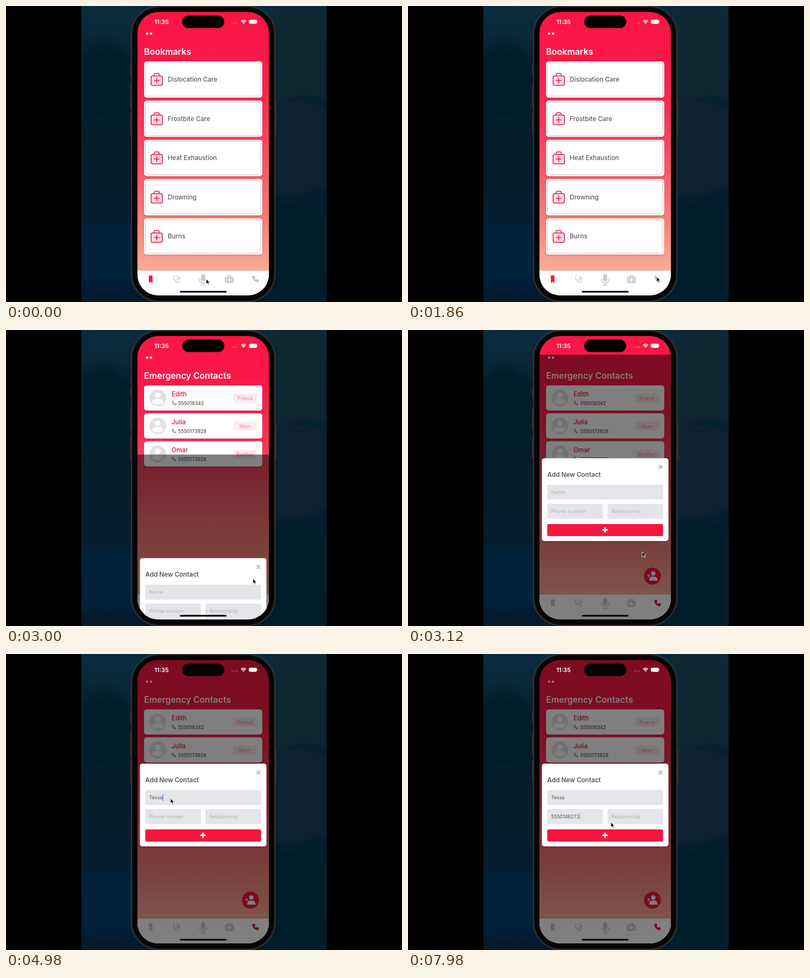
Write an HTML page that moves like this. It is 720 px wide and 540 px high and loops after 8000 ms.

```html
<!DOCTYPE html>
<html lang="en">
<head>
<meta charset="utf-8">
<title>Emergency contacts</title>
<style>
  html, body { margin: 0; width: 100%; height: 100%; overflow: hidden; background: #000; }
  svg { display: block; width: 720px; height: 540px; }
  text { font-family: Inter, "Open Sans", sans-serif; font-weight: 500; white-space: pre; }
  .title { font-size: 15.7px; font-weight: 600; fill: #fff; }
  .item { font-size: 11.5px; fill: #5c5c60; }
  .name { font-size: 11.5px; fill: #e5133f; }
  .num { font-size: 8.7px; fill: #4f4f53; }
  .tag { font-size: 9px; font-weight: 400; fill: #f4819c; text-anchor: middle; }
  .head { font-size: 11.5px; font-weight: 600; fill: #58585c; }
  .hint { font-size: 9.1px; font-weight: 400; fill: #b4b5ba; }
  .typed { font-size: 8.6px; fill: #66676b; }
  .clock { font-size: 10.8px; font-weight: 600; fill: #fff; }
</style>
</head>
<body>
<svg id="stage" viewBox="0 0 720 540" xmlns="http://www.w3.org/2000/svg"></svg>
<script>
const LOOP = 8000, RED = '#f7153f', GREY = '#c9c9cb';
const TOP = 11, HEIGHT = 517;

const rect = (x, y, w, h, r, fill, more = '') =>
  `<rect x="${x}" y="${y}" width="${w}" height="${h}" rx="${r}" fill="${fill}" ${more}/>`;
const circle = (x, y, r, fill, more = '') => `<circle cx="${x}" cy="${y}" r="${r}" fill="${fill}" ${more}/>`;
const path = (d, fill, more = '') => `<path d="${d}" fill="${fill}" ${more}/>`;
const line = (d, color, width) =>
  path(d, 'none', `stroke="${color}" stroke-width="${width}" stroke-linecap="round" stroke-linejoin="round"`);
const text = (x, y, cls, str, more = '') => `<text x="${x}" y="${y}" class="${cls}" ${more}>${str}</text>`;
const group = (id, body) => `<g id="${id}">${body}</g>`;
const gradient = (id, stops) =>
  `<linearGradient id="${id}" gradientUnits="userSpaceOnUse" x1="0" y1="0" x2="0" y2="540">` +
  stops.map(([y, c]) => `<stop offset="${y / 540}" stop-color="${c}"/>`).join('') + '</linearGradient>';

// ---- icons ----
const handset = (x, y, size, color) => path(
  'M3.5 1 6.2.5 8 4.6 6.2 6.2C7 8 8 9.2 9.9 10L11.5 8.1 15.6 9.9 15 12.8C14.7 14.7 14 15.3 12.6 15.2 6.3 14.4 1.7 9.7.8 3.4.7 2 1.5 1.3 3.5 1Z',
  color, `transform="translate(${x} ${y}) scale(${size / 16})"`);

const kit = y =>
  line(`M269.5 ${y - 6.5}v-2.4q0-2 2-2h5q2 0 2 2v2.4`, '#e3194a', 1.5) +
  rect(263.8, y - 6.5, 20.6, 17.3, 3, '#fcdbe2', 'stroke="#e3194a" stroke-width="1.5"') +
  line(`M269.4 ${y + 2.1}h9.2M274 ${y - 2.5}v9.2`, '#e3194a', 1.5);

const avatar = y =>
  circle(276, y, 15.3, '#e1e1e3') + circle(276, y - 4.8, 5.3, '#fff') +
  path(`M265.8 ${y + 9.6}q.4-7.6 6.8-7.6h6.8q6.4 0 6.8 7.6q-10 4-20.4 0z`, '#fff');

const tabIcons =
  line('M306 492.4h-1.2v4q0 3.6 3.6 3.6t3.6-3.6v-4h-1.2M308.4 500v1.2q0 3.4 3.3 3.4t3.3-3.4v-3', GREY, 1.3) +
  circle(315, 496.4, 1.4, 'none', `stroke="${GREY}" stroke-width="1.2"`) +
  rect(354.7, 489, 7.6, 13.4, 3.8, GREY) +
  line('M352 498.2v1.2q0 5.8 6.5 5.8t6.5-5.8v-1.2M358.5 505.4v3.4M354.8 509.2h7.4', GREY, 1.5) +
  line('M402.8 494v-1.4q0-1 1-1h4.4q1 0 1 1v1.4', GREY, 1.6) +
  rect(398, 493.8, 16, 11.6, 1.6, GREY) +
  path('M400.5 493.8h.9v11.6h-.9zM410.6 493.8h.9v11.6h-.9zM404.9 495.9h2.2v2.5h2.5v2.2h-2.5v2.5h-2.2v-2.5h-2.5v-2.2h2.5z', '#fff');

const tabBar = (mark, call) =>
  rect(239, 481, 239, 2, 0, '#8a4040', 'opacity=".13"') + rect(239, 482.5, 239, 46, 0, '#fff') +
  path('M259.7 491.4h6.6v14l-3.3-2.6-3.3 2.6z', mark) + tabIcons + handset(447, 491.4, 13.2, call);

const addButton =
  circle(444.5, 449, 15.4, RED) + circle(446, 444.3, 4, '#fff') +
  path('M438.4 457.2q.2-7 5-7.4h5.2q4.8.4 5 7.4z', '#fff') +
  line('M435.3 448.2h4.8M437.7 445.8v4.8', '#fff', 1.2);

// ---- screens ----
const title = str => text(251, 89, 'title', str);
const topics = ['Dislocation Care', 'Frostbite Care', 'Heat Exhaustion', 'Drowning', 'Burns'];
const bookmarks = title('Bookmarks') + topics.map((topic, i) => {
  const y = 101 + i * 71.6;
  return rect(251, y, 215, 66.2, 5, '#fff', 'filter="url(#shade)"') +
    rect(253.5, y + 2.5, 210, 61.2, 3.5, 'none', 'stroke="#c7bfc3" stroke-width=".9"') +
    kit(y + 33) + text(294, y + 37, 'item', topic);
}).join('') + tabBar(RED, GREY);

const people = [
  ['Edith', '555018342', 'Friend'],
  ['Julia', '5550173928', 'Mom'],
  ['Omar', '5550173928', 'Brother']
];
const contacts = title('Emergency Contacts') + people.map(([name, phone, tag], i) => {
  const y = 101 + i * 51;
  return rect(251, y, 215, 46, 5, '#fff', 'filter="url(#shade)"') + avatar(y + 23) +
    text(301, y + 20, 'name', name) +
    handset(301, y + 28, 9, '#a9a9ac') + text(313, y + 36, 'num', phone) +
    rect(413.5, y + 15.2, 42.6, 16, 2, '#fdeaee') + text(434.8, y + 26.6, 'tag', tag);
}).join('') + addButton + tabBar(GREY, RED);

const field = (x, y, w) => rect(x, y, w, 27.2, 3, '#e4e5e9');
const dialog =
  rect(243.5, 200, 230, 151, 4.5, '#fff', 'filter="url(#shade)"') +
  line('M456.4 213.4l5.2 5.2m0-5.2l-5.2 5.2', '#bcbdc0', 2.3) +
  text(253.3, 234, 'head', 'Add New Contact') +
  field(253.2, 248.2, 210.6) + field(253.2, 283, 101.2) + field(362.6, 283, 101.2) +
  text(260.3, 265, 'hint', 'Name', 'id="nameHint"') + text(260.3, 299.8, 'hint', 'Phone number', 'id="phoneHint"') +
  text(369.8, 299.8, 'hint', 'Relationship') +
  text(260.3, 265, 'typed', '', 'id="nameText"') + text(260.3, 299.6, 'typed', '', 'id="phoneText"') +
  rect(0, 0, 1.3, 12.6, .6, '#4a6fd8', 'id="caret"') +
  rect(253.2, 320, 210.6, 22, 2.5, RED) + path('M356.7 326h3v3.3h3.3v3h-3.3v3.3h-3v-3.3h-3.3v-3h3.3z', '#fff');

const statusBar =
  rect(320.4, 17.5, 76.4, 22.8, 11.4, '#000') + text(269.8, 32.6, 'clock', '11:35') +
  [0, 1, 2, 3].map(i => circle(411.3 + i * 3.2, 31, 1, '#fff', 'opacity=".35"')).join('') +
  line('M427.9 27.4q4-3.4 8 0M429.5 29.4q2.4-2 4.8 0', '#fff', 1.5) + path('M430.4 30.8q1.5-1 3 0l-1.5 1.8z', '#fff') +
  rect(441.6, 25, 14.6, 7.4, 2.3, '#fff') + rect(456.8, 27.4, 1, 2.6, .5, '#fff', 'opacity=".6"');

const wallpaper =
  rect(137, 0, 446, 540, 0, 'url(#night)') +
  `<g clip-path="url(#wall)"><g filter="url(#soft)">` +
  path('M130 90q30-25 50-22t60 36v130q-60-30-110-10z', '#061c2b') +
  path('M480 0h110v170q-60-20-110 10z', '#0f2833') +
  path('M480 190q50-30 110 0v130q-60 40-110 20z', '#0a2230') +
  path('M480 360h110v190h-110z', '#061a2a') +
  path('M130 400h110v110h-110z', '#06203a') + '</g></g>';

const phoneBody =
  [[225, 104, 20], [225, 144, 40], [225, 195, 40], [488, 171, 64]]
    .map(([x, y, h]) => rect(x, y, 4, h, 1.2, '#2b2b2d')).join('') +
  rect(228.2, .8, 260.8, 538.4, 50, '#050505', 'stroke="#3d3d3f" stroke-width="1.6"') +
  rect(230.2, 2.8, 256.8, 534.4, 48, 'none', 'stroke="#171718" stroke-width="1.2"');

const stage = document.getElementById('stage');
stage.innerHTML = `<defs>
  ${gradient('night', [[0, '#0a2c3f'], [90, '#082535'], [250, '#051c2a'], [400, '#061e31'], [540, '#051a2b']])}
  ${gradient('sky', [[11, '#fc1545'], [85, '#fa1848'], [170, '#f72a50'], [250, '#f64560'], [330, '#f6666f'], [400, '#f78479'], [480, '#faab95']])}
  <clipPath id="wall">${rect(137, 0, 446, 540, 0, '#000')}</clipPath>
  <clipPath id="screen">${rect(239, TOP, 239, HEIGHT, 38, '#000')}</clipPath>
  <filter id="soft"><feGaussianBlur stdDeviation="9"/></filter>
  <filter id="shade" x="-5%" y="-10%" width="110%" height="125%">
    <feDropShadow dx="0" dy="1.2" stdDeviation="1.3" flood-color="#501020" flood-opacity=".3"/></filter>
</defs>` + wallpaper + phoneBody +
  `<g clip-path="url(#screen)">` +
  rect(239, TOP, 239, HEIGHT, 0, 'url(#sky)') +
  circle(256.6, 50.4, 2.2, '#fff') + circle(263.7, 50.4, 2.2, '#fff') +
  group('bookmarks', bookmarks) + group('contacts', contacts) +
  group('sheet', rect(239, TOP, 239, HEIGHT, 0, '#000', 'opacity=".5"') + dialog) +
  statusBar + rect(316, 519.7, 85, 3, 1.5, '#000') + '</g>' +
  group('pointer', path('M0 0v9.2l2.1-1.9 1.5 3.3 1.6-.7-1.5-3.2h2.9z', '#000',
    'stroke="#fff" stroke-width=".8" stroke-linejoin="round"'));

// ---- motion ----
const OPEN = 2917, SLIDE = 467, SWITCH = 2010;
const route = [
  [0, 364, 498], [480, 364, 498], [1260, 452, 494], [2130, 452, 494], [2600, 449, 455],
  [2950, 449, 455], [3000, 449, 454], [3120, 426, 405], [3480, 337, 277], [3690, 300, 262],
  [4890, 300, 262], [5580, 282, 295], [7170, 282, 295], [7920, 369, 307], [8000, 369, 307]
];
const NAME = { str: 'Tessa', focus: 3750, keys: [4260, 4470, 4530, 4590, 4650], y: 255.4 };
const PHONE = {
  str: '5550146273', focus: 5610, y: 290,
  keys: [5730, 5880, 6150, 6360, 6480, 6600, 6720, 6840, 6960, 7080]
};

const el = Object.fromEntries([...stage.querySelectorAll('[id]')].map(n => [n.id, n]));
const clamp = v => Math.max(0, Math.min(1, v));
const show = (node, on) => node.setAttribute('visibility', on ? 'visible' : 'hidden');

// cubic-bezier(.32, .72, 0, 1)
function sheetEase(p) {
  let lo = 0, hi = 1;
  for (let i = 0; i < 24; i++) {
    const s = (lo + hi) / 2, r = 1 - s;
    if (.96 * r * r * s + s ** 3 < p) lo = s; else hi = s;
  }
  const s = (lo + hi) / 2, r = 1 - s;
  return 2.16 * r * r * s + 3 * r * s * s + s ** 3;
}

function slope(i, k) {
  const a = route[i - 1], b = route[i], c = route[i + 1];
  if (!a || !c || a[k] === b[k] || b[k] === c[k]) return 0;
  return (c[k] - a[k]) / (c[0] - a[0]);
}

// Smooth curve through the stops, at rest where two stops agree
function pointerAt(t) {
  let i = 0;
  while (i < route.length - 2 && t >= route[i + 1][0]) i++;
  const a = route[i], b = route[i + 1], d = b[0] - a[0], u = (t - a[0]) / d;
  return [1, 2].map(k =>
    a[k] + (b[k] - a[k]) * u * u * (3 - 2 * u) +
    d * u * (1 - u) * (slope(i, k) * (1 - u) - slope(i + 1, k) * u));
}

function fill(input, node, hint, t) {
  const count = input.keys.filter(k => t >= k).length;
  node.textContent = input.str.slice(0, count);
  show(hint, !count);
}

function placeCaret(t) {
  const phone = t >= PHONE.focus;
  const input = phone ? PHONE : NAME, node = phone ? el.phoneText : el.nameText;
  const last = [input.focus, ...input.keys].filter(k => t >= k).pop();
  const phase = (t - last) % 1000;
  const glow = phase < 500 ? 1 : phase < 700 ? clamp((560 - phase) / 60) : clamp((phase - 860) / 100);
  el.caret.setAttribute('x', 259.8 + (node.textContent ? node.getComputedTextLength() + .6 : 0));
  el.caret.setAttribute('y', input.y);
  el.caret.setAttribute('opacity', last === undefined ? 0 : glow);
}

function draw(t) {
  show(el.bookmarks, t < SWITCH);
  show(el.contacts, t >= SWITCH);
  const drop = HEIGHT * (1 - sheetEase(clamp((t - OPEN) / SLIDE)));
  el.sheet.setAttribute('transform', `translate(0 ${drop})`);
  fill(NAME, el.nameText, el.nameHint, t);
  fill(PHONE, el.phoneText, el.phoneHint, t);
  placeCaret(t);
  el.pointer.setAttribute('transform', `translate(${pointerAt(t)})`);
}

const start = performance.now();
function tick() {
  draw((performance.now() - start) % LOOP);
  requestAnimationFrame(tick);
}
tick();
</script>
</body>
</html>
```
